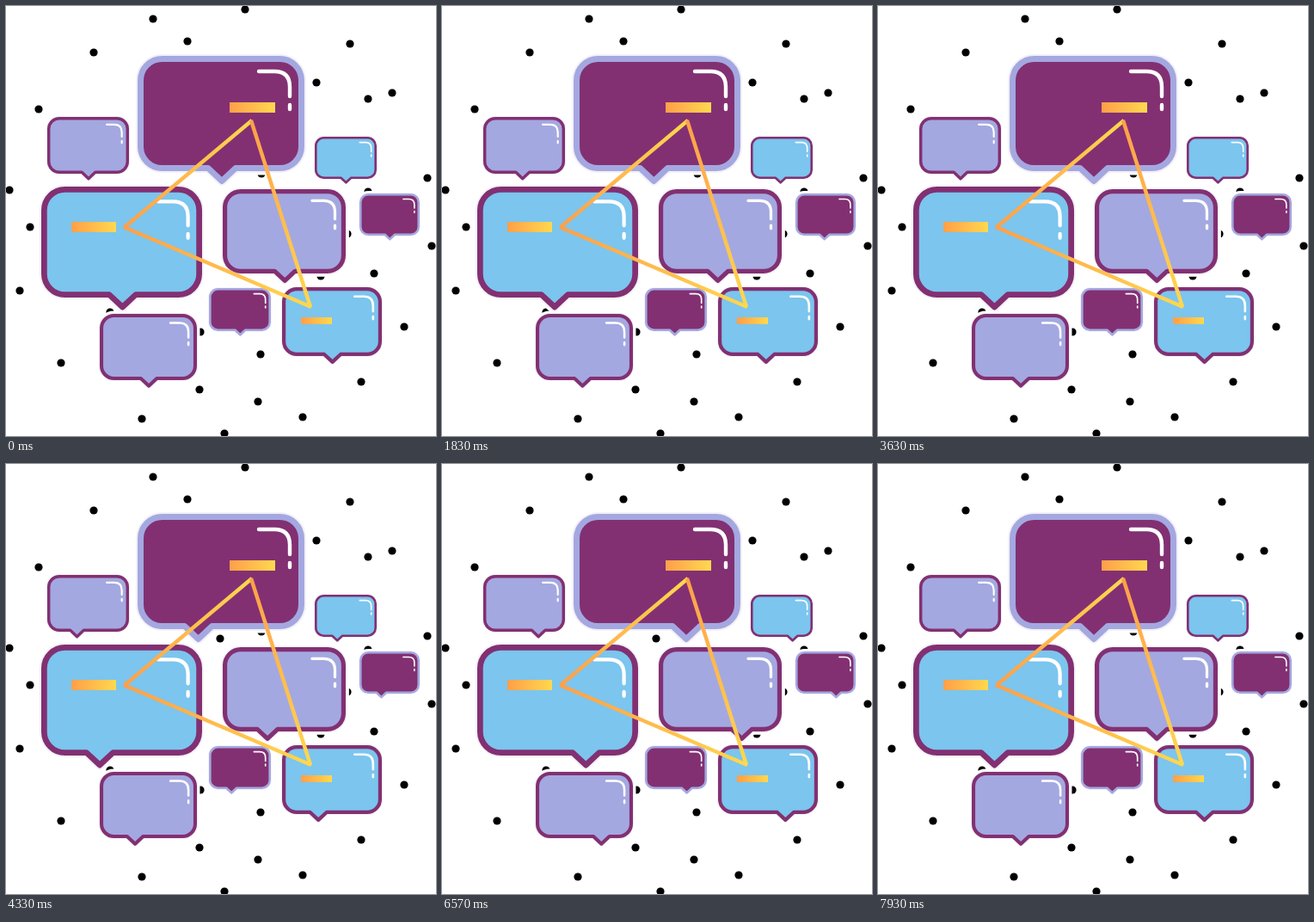
Animation, 500 px wide and 500 px high, one loop 8030 ms. Source, as an HTML page with a canvas:

```html
<!DOCTYPE html>
<html lang="en">
<head>
<meta charset="utf-8">
<title>Speech bubbles</title>
<style>
html, body { margin: 0; width: 100%; height: 100%; overflow: hidden; background: #fff; }
canvas { display: block; width: 100vmin; height: 100vmin; }
</style>
</head>
<body>
<canvas id="stage" width="500" height="500"></canvas>
<script>
const ctx = document.getElementById('stage').getContext('2d');
const LOOP = 8030;
const PLUM = '#823072', LILAC = '#a4a8e0', SKY = '#7bc5ee';

const dots = [
  [278, 4], [171, 15], [211, 41], [102, 54], [400, 44], [361, 89], [421, 108], [449, 101],
  [38, 120], [4, 214], [28, 257], [16, 331], [490, 200], [495, 279], [428, 311], [463, 373],
  [413, 437], [64, 415], [225, 446], [158, 480], [293, 460], [345, 478], [254, 497], [296, 405],
  [121, 356], [226, 379], [249, 203], [297, 195], [397, 265], [366, 314], [421, 216]
];

// left, top, right, bottom, fill, border
const bubbles = [
  [153, 58, 347, 192, PLUM, LILAC],
  [41, 210, 228, 339, SKY, PLUM],
  [48, 129, 143, 195, LILAC, PLUM],
  [359, 152, 431, 201, SKY, PLUM],
  [411, 218, 481, 267, PLUM, LILAC],
  [252, 213, 395, 311, LILAC, PLUM],
  [236, 328, 308, 378, PLUM, LILAC],
  [321, 327, 437, 407, SKY, PLUM],
  [109, 358, 222, 435, LILAC, PLUM]
];

const linear = p => p;
const easeOut = p => 1 - (1 - p) ** 3;
const easeInOut = p => (1 - Math.cos(Math.PI * p)) / 2;

// time in ms, tail offset, easing towards it
const keys = [
  [0, 0, linear], [700, -12.5, linear], [1400, -12.5, linear], [2800, 13, linear],
  [3430, 0, linear], [4000, 0, linear], [4350, -29, linear], [4700, 0, linear],
  [5400, 0, linear], [6200, 37, easeOut], [7950, 0, easeInOut], [LOOP, 0, linear]
];

function tailOffset(t) {
  const i = keys.findIndex(k => k[0] > t);
  const [t0, a] = keys[i - 1], [t1, b, ease] = keys[i];
  return a + (b - a) * ease((t - t0) / (t1 - t0));
}

function stroke(color, width) {
  ctx.strokeStyle = color;
  ctx.lineWidth = width;
  ctx.stroke();
}

function outline(l, t, r, b, rad, tip, s) {
  ctx.beginPath();
  ctx.moveTo(l + rad, t);
  ctx.arcTo(r, t, r, b, rad);
  ctx.arcTo(r, b, l, b, rad);
  ctx.lineTo(tip + 16 * s, b);
  ctx.lineTo(tip, b + 15 * s);
  ctx.lineTo(tip - 16 * s, b);
  ctx.arcTo(l, b, l, t, rad);
  ctx.arcTo(l, t, r, t, rad);
  ctx.closePath();
}

function drawBubble([l, t, r, b, fill, border], offset) {
  const s = (r - l) / 194, w = 7 * s, h = w / 2;
  outline(l + h, t + h, r - h, b - h, 25 * s, (l + r) / 2 + (1 + offset) * s, s);
  ctx.lineJoin = 'round';
  stroke('#fff', w + 4 + 5 * s);
  stroke('#f3f0f8', w + 4 * s);
  ctx.fillStyle = fill;
  ctx.fill();
  stroke(border, w);

  // shine in the upper right corner
  ctx.lineCap = 'round';
  ctx.beginPath();
  ctx.moveTo(r - 53 * s, t + 18 * s);
  ctx.lineTo(r - 35 * s, t + 18 * s);
  ctx.quadraticCurveTo(r - 17 * s, t + 18 * s, r - 17 * s, t + 36 * s);
  ctx.lineTo(r - 17 * s, t + 47 * s);
  ctx.moveTo(r - 17 * s, t + 57 * s);
  ctx.lineTo(r - 17 * s, t + 62 * s);
  stroke('#fff', 4.4 * s);
}

function gold(x0, y0, x1, y1) {
  const g = ctx.createLinearGradient(x0, y0, x1, y1);
  g.addColorStop(0, '#ff9f4a');
  g.addColorStop(1, '#ffd84f');
  return g;
}

function bar(x, y, w, h) {
  ctx.fillStyle = gold(x, y, x + w, y);
  ctx.fillRect(x, y, w, h);
}

function link(x0, y0, x1, y1) {
  ctx.lineCap = 'butt';
  ctx.beginPath();
  ctx.moveTo(x0, y0);
  ctx.lineTo(x1, y1);
  stroke(gold(x0, y0, x1, y1), 4.4);
}

function draw(t) {
  ctx.fillStyle = '#fff';
  ctx.fillRect(0, 0, 500, 500);
  ctx.fillStyle = '#000';
  for (const [x, y] of dots) {
    ctx.beginPath();
    ctx.arc(x, y, 4.6, 0, 2 * Math.PI);
    ctx.fill();
  }
  const offset = tailOffset(t);
  for (const bubble of bubbles) drawBubble(bubble, offset);
  bar(260, 112, 53, 12);
  bar(76, 251, 52, 12);
  bar(343, 362, 36, 8);
  link(138, 257, 286, 133);
  link(137, 257, 355, 350);
  link(285, 133, 354, 350);
}

const start = performance.now();
function tick() {
  draw((performance.now() - start) % LOOP);
  requestAnimationFrame(tick);
}
tick();
</script>
</body>
</html>
```
